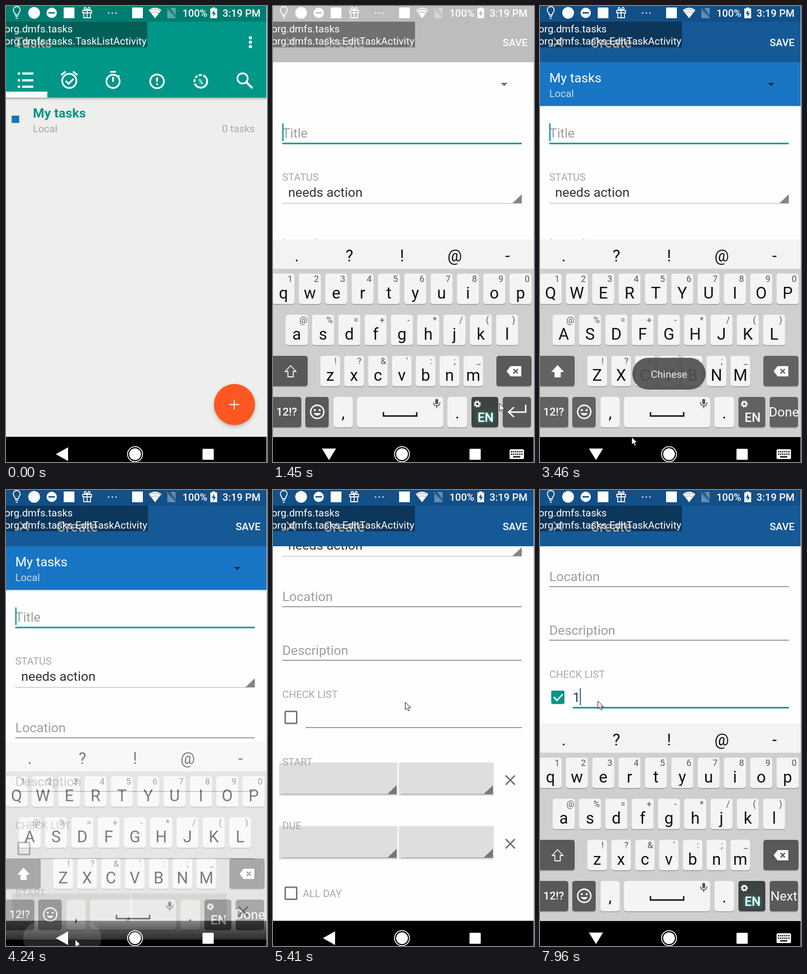
An HTML page for the animation above (8000 ms loop, 534 by 932 pixels).

```html
<!DOCTYPE html>
<html lang="en">
<head>
<meta charset="utf-8">
<title>Task editor</title>
<style>
html,body{margin:0;width:100%;height:100%;overflow:hidden;background:#000}
svg{display:block;width:534px;height:932px}
text{font:20.8px Roboto,sans-serif;white-space:pre}
.big{font-size:26.7px}
.med{font-weight:500}
.bold{font-weight:700}
.title{font-size:29px;font-weight:500}
.mid{text-anchor:middle}
.letter{font-size:33px;text-anchor:middle;fill:#111}
.alt{font-size:18px;text-anchor:middle;fill:#555}
.hint{fill:#9e9e9e}
.label{fill:#a8a8a8}
.line{fill:none;stroke:#fff;stroke-width:3.5}
.white{fill:#fff}
.rule{stroke:#757575;stroke-width:1.5}

.anim{animation:8s linear infinite}
.step{animation:8s step-end infinite}
#edit{animation-name:enter}
.paint{animation-name:paint}
#form{animation-name:scroll}
#kbA{animation-name:kbA}
#kbB{animation-name:kbB}
#kbC{animation-name:kbC}
#toast{animation-name:toast}
#pill{animation-name:pill}
#press{animation-name:press}
#ripple{animation-name:ripple;transform-box:fill-box;transform-origin:center}
#mouse{animation-name:mouse;animation-timing-function:ease-in-out}
#nameA{animation-name:nameA}
#nameB{animation-name:nameB}
#down{animation-name:down}
#back{animation-name:back}
#caret{animation-name:caret}
#checked{animation-name:checked}
#tick{animation-name:tick}
#focus{animation-name:focus}
#caret2{animation-name:caret2}
#typed{animation-name:typed}
#border{animation-name:border}

@keyframes enter{
  0%,12.375%{opacity:0;transform:translateY(75px);animation-timing-function:ease-out}
  15.8%,100%{opacity:1;transform:none}}
@keyframes paint{0%,18.9%{opacity:0}21.2%,100%{opacity:1}}
@keyframes scroll{
  0%,62.5%{transform:none;animation-timing-function:ease-in-out}
  67.5%,69.5%{transform:translateY(-268px);animation-timing-function:ease-out}
  72.5%,100%{transform:translateY(-309px)}}
@keyframes kbA{
  0%,15%{opacity:0;transform:translateY(70px);animation-timing-function:ease-out}
  17.75%,22.875%{opacity:1;transform:none}
  25.1%,100%{opacity:0;transform:translateY(70px)}}
@keyframes kbB{
  0%,24.875%{opacity:0;transform:translateY(70px);animation-timing-function:ease-out}
  27.75%{opacity:1;transform:translateY(3px);animation-timing-function:ease-out}
  28.4%,51%{opacity:1;transform:none;animation-timing-function:linear}
  55.5%,100%{opacity:0;transform:translateY(85px)}}
@keyframes kbC{
  0%,87.875%{opacity:0;transform:translateY(70px);animation-timing-function:ease-out}
  91%,100%{opacity:1;transform:none}}
@keyframes toast{0%,24%{opacity:0}26.5%,46.1%{opacity:1}49%,100%{opacity:0}}
@keyframes pill{0%,51%{opacity:0}52%,53.5%{opacity:1}56.75%,100%{opacity:0}}
@keyframes press{0%{opacity:0}6.625%{opacity:1}16%,100%{opacity:0}}
@keyframes ripple{
  0%,80%{opacity:0;transform:scale(.3)}
  81%,83.5%{opacity:1;transform:none}
  86%,100%{opacity:0;transform:none}}
@keyframes mouse{
  0%{opacity:0;transform:translate(455px,917px);animation-timing-function:step-end}
  .875%{opacity:1;transform:translate(454px,899px)}
  2.625%{opacity:1;transform:translate(453px,848px);animation-timing-function:step-end}
  6.625%,35.375%{transform:translate(463px,812px)}
  45.125%{transform:translate(165px,886px)}
  49%,58.875%{transform:translate(141px,918px)}
  62%,72.5%{transform:translate(270px,433px)}
  77.4%,83%{transform:translate(44px,423px)}
  86%,100%{transform:translate(118px,431px)}}
@keyframes nameA{0%{opacity:1}12.375%,100%{opacity:0}}
@keyframes nameB{0%{opacity:0}12.375%,100%{opacity:1}}
@keyframes down{0%{opacity:0}15.6%{opacity:1}52%{opacity:0}88.5%,100%{opacity:1}}
@keyframes back{0%{opacity:1}15.6%{opacity:0}52%{opacity:1}88.5%,100%{opacity:0}}
@keyframes caret{0%{opacity:1}35.4%{opacity:0}41.8%{opacity:1}48.2%{opacity:0}51%,100%{opacity:1}}
@keyframes checked{0%{opacity:0}80%,100%{opacity:1}}
@keyframes tick{0%{opacity:0}82.5%,100%{opacity:1}}
@keyframes focus{0%{opacity:0}87.875%,100%{opacity:1}}
@keyframes caret2{0%{opacity:0}87.875%{opacity:1}93.75%{opacity:0}97.5%,100%{opacity:1;transform:translateX(14px)}}
@keyframes typed{0%{opacity:0}97.5%,100%{opacity:1}}
@keyframes border{0%{fill:#fff}4.5%,100%{fill:#c4c4c4}}
</style>
</head>
<body>
<svg viewBox="0 0 534 932">
  <defs>
    <filter id="soft" x="-30%" y="-30%" width="160%" height="160%"><feGaussianBlur stdDeviation="4"/></filter>
    <filter id="edge" x="-5%" y="-10%" width="110%" height="120%"><feGaussianBlur stdDeviation="1.2"/></filter>
    <filter id="glow" x="-40%" y="-40%" width="180%" height="180%"><feDropShadow dx="0" dy="0" stdDeviation="3" flood-color="#10c8b4"/></filter>
    <linearGradient id="fall" x2="0" y2="1"><stop stop-opacity=".28"/><stop offset="1" stop-opacity="0"/></linearGradient>
    <linearGradient id="dim" x2="0" y2="1"><stop stop-opacity="0"/><stop offset="1" stop-opacity=".85"/></linearGradient>
  </defs>

  <g id="list">
    <rect width="534" height="932" fill="#eeeeec"/>
    <rect width="534" height="187" fill="#009688"/>
    <rect width="534" height="32" fill="#007d71"/>
    <rect y="187" width="534" height="6" fill="url(#fall)"/>
    <text class="title white" x="18" y="85">Tasks</text>
    <g class="white"><circle cx="500" cy="65" r="3.3"/><circle cx="500" cy="74" r="3.3"/><circle cx="500" cy="83" r="3.3"/></g>
    <rect y="175" width="84.500" height="12" class="white"/>
    <g class="line">
      <path d="M24 138h5m4 0h23M24 152h5m4 0h23M24 165h5m4 0h23" stroke-width="4.5"/>
      <circle cx="129.500" cy="153" r="14.500"/><path d="M122 153l6 6 10-10M113 141l9-7M146 141l-9-7"/>
      <circle cx="219" cy="154" r="13.500"/><path d="M213 134.500h12M219 145v10M229 142l3 3"/>
      <circle cx="309" cy="154" r="14"/><path d="M309 146v9M309 158v3.500"/>
      <circle cx="398.500" cy="154" r="13" stroke-width="4" stroke-dasharray="36 3 6 3 6 3 6 3"/>
      <circle cx="484" cy="148" r="10.500"/><path d="M491 155l13 13" stroke-width="4.500"/>
    </g>
    <text class="med white mid" x="398.500" y="159.500" style="font-size:15px">%</text>
    <rect x="11.500" y="224" width="15.500" height="15" fill="#1976b4"/>
    <text class="big bold" x="55" y="228" fill="#009688">My tasks</text>
    <text class="label" x="55" y="258">Local</text>
    <text class="label" x="509" y="258" text-anchor="end">0 tasks</text>
    <circle cx="467.500" cy="818" r="41" opacity=".3" filter="url(#soft)"/>
    <circle cx="467.500" cy="814.500" r="42" fill="#ff5722"/>
    <circle id="press" class="step white" cx="467.500" cy="814.500" r="42" fill-opacity=".15"/>
    <path class="line" d="M457 814.500h20M467 804.500v20" style="stroke-width:2"/>
  </g>

  <g id="edit" class="anim">
    <rect width="534" height="1010" fill="#fefefe"/>
    <g id="form" class="anim">
      <g class="anim paint">
        <rect y="110" width="534" height="94.500" fill="#1976c5"/>
        <text class="big white" x="19" y="156">My tasks</text>
        <text class="white" x="19" y="186" opacity=".75">Local</text>
      </g>
      <path d="M466 157h14l-7 7z" fill="#000" opacity=".55"/>
      <text class="big hint" x="19" y="269">Title</text>
      <rect x="19" y="279.500" width="490" height="3" fill="#009688"/>
      <rect id="caret" class="step" x="19" y="240" width="2.500" height="36" fill="#009688"/>
      <text class="label" x="19" y="357">STATUS</text>
      <text class="big" x="31" y="390" fill="#333">needs action</text>
      <path d="M19 403.500h490" stroke="#c4c4c4" stroke-width="1.500"/>
      <path d="M509 385v18h-19z" fill="#858585"/>
      <text class="big hint" x="19" y="495">Location</text><path class="rule" d="M19 506.500h490"/>
      <text class="big hint" x="19" y="605">Description</text><path class="rule" d="M19 616h490"/>
      <text class="label" x="19" y="693">CHECK LIST</text>
      <circle id="ripple" class="anim" cx="38" cy="732" r="25" fill="#009688" fill-opacity=".13"/>
      <rect x="25" y="720.500" width="23.500" height="24.500" rx="1.500" fill="#fefefe" stroke="#757575" stroke-width="3"/>
      <g id="checked" class="step">
        <rect x="23" y="719" width="27" height="27" rx="3" fill="#009688"/>
        <path id="tick" class="step line" d="M28 732l6.500 7 12-12.500" style="stroke-width:3"/>
      </g>
      <path class="rule" d="M67 753.500h442"/>
      <rect id="focus" class="step" x="67" y="752.500" width="442" height="3" fill="#009688"/>
      <text id="typed" class="big step" x="67" y="742" fill="#333">1</text>
      <rect id="caret2" class="step" x="67.500" y="714" width="2.200" height="35" fill="#2c6484"/>
      <g id="dates"></g>
      <rect x="25" y="1080" width="23.500" height="24.500" rx="1.500" fill="none" stroke="#757575" stroke-width="3"/>
      <text class="label" x="61" y="1100">ALL DAY</text>
      <text class="label" x="19" y="1180">TIME ZONE</text>
    </g>
    <rect width="534" height="115" fill="#bdbdbd"/>
    <g class="anim paint"><rect width="534" height="115" fill="#155a96"/><rect width="534" height="32" fill="#125088"/></g>
    <path class="line" d="M28 65l18 18M46 65l-18 18" style="stroke-width:3"/>
    <text class="title white" x="103" y="85">Create</text>
    <text class="med white" x="470" y="82">SAVE</text>
  </g>

  <rect y="880.500" width="534" height="52"/>
  <g id="kbA" class="anim"></g>
  <g id="kbB" class="anim"></g>
  <g id="kbC" class="anim"></g>
  <rect y="881" width="534" height="51" fill="url(#dim)"/>
  <rect id="pill" class="anim" x="35" y="882" width="160" height="68" rx="34" fill="#fff" fill-opacity=".14"/>
  <g class="white">
    <path id="back" class="step" d="M102 916l25-14v28z"/>
    <g id="down" class="step">
      <path d="M100 904.500h29l-14.500 23.500z"/>
      <rect x="484" y="906" width="29.500" height="20" rx="2.500"/>
      <path d="M487 911h24M487 916h24" stroke="#000" stroke-width="2.500" stroke-dasharray="2.600 1.600"/>
      <path d="M491 921.500h15" stroke="#000" stroke-width="2.500"/>
    </g>
    <circle cx="264" cy="916" r="12"/>
    <circle cx="264" cy="916" r="15.300" fill="none" stroke="#fff" stroke-width="1.800"/>
    <rect x="402" y="905" width="23" height="22.500" rx="1.500"/>
  </g>

  <g id="toast" class="anim">
    <rect x="189" y="719" width="150" height="65" rx="32.500" fill="#505050" opacity=".92"/>
    <text class="mid" x="264" y="760" fill="#eee">Chinese</text>
  </g>

  <g class="white">
    <path d="M19 18c0-4-4-5-4-10a7 7 0 0 1 14 0c0 5-4 6-4 10z" fill="none" stroke="#fff" stroke-width="1.800"/>
    <path d="M19 21h6M20 25h4" stroke="#fff" stroke-width="2"/>
    <circle cx="57.500" cy="14" r="12"/>
    <path fill-rule="evenodd" d="M93.500 3.500a10.500 10.500 0 1 0 .01 0zM87 12.500h13v3H87z"/>
    <rect x="118" y="3" width="22" height="22"/>
    <path d="M157 9h18v5h-18zM159 14h14v10h-14zM166 9v15M166 9c-8-1-7-7-3-6l3 6c8-1 7-7 3-6z" fill="none" stroke="#fff" stroke-width="1.800"/>
    <circle cx="210" cy="14.500" r="1.400"/><circle cx="217.500" cy="14.500" r="1.400"/><circle cx="225" cy="14.500" r="1.400"/>
    <rect x="258" y="3" width="22" height="22"/>
    <path d="M305 25L292 8.500q13-10 26 0z"/>
    <path d="M293.500 10.500q11.500-8 23 0M297 14.500q8-5 16 0" fill="none" stroke="#000" stroke-opacity=".3" stroke-width="1.500"/>
    <path d="M336 4h11v16zM330 8l17 17h-17z" opacity=".35"/>
    <path d="M329 4l18 20" stroke="#fff" stroke-width="1.500" opacity=".35"/>
    <path fill-rule="evenodd" d="M422 3h6v2h4v20h-14V5h4zM426 8l-5 8h3.500v6l5-8H426z"/>
    <text class="med" x="361" y="22">100%</text>
    <text class="med" x="443" y="22">3:19 PM</text>
  </g>

  <g id="nameA" class="step"><rect y="32" width="289" height="52.500" opacity=".36"/><text class="white" x="-3" y="79">org.dmfs.tasks.TaskListActivity</text></g>
  <g id="nameB" class="step"><rect y="32" width="290.500" height="52.500" opacity=".4"/><text class="white" x="-3" y="79">org.dmfs.tasks.EditTaskActivity</text></g>
  <text class="white" x="-3" y="54">org.dmfs.tasks</text>

  <rect id="border" class="step" x="533" width="1" height="932"/>
  <path id="mouse" class="anim" d="M.5 .5v15.500l3.600-3.300 2.600 5.800 2.600-1.200-2.600-5.600h5z" fill="#fff" stroke="#111"/>
</svg>
<script>
const $ = id => document.getElementById(id);
const label = (x, y, s, cls, extra = '') =>
  `<text class="${cls}" x="${x}" y="${y}" ${extra}>${s.replace('&', '&amp;')}</text>`;
const rect = (x, y, w, h, fill, extra = '') =>
  `<rect x="${x}" y="${y}" width="${w}" height="${h}" fill="${fill}" ${extra}/>`;
const key = (x, y, w, fill = '#f4f4f3') =>
  rect(x, y + 2, w, 62, '#0003', 'rx="5"') + rect(x, y, w, 62, fill, 'rx="5"');

const rows = [
  ['qwertyuiop', '1234567890', -1, 547, 45, 53.9],
  ['asdfghjkl', '@%=+-*/()', 26, 631, 45, 53.8],
  ['zxcvbnm', "!?&':;_", 97, 715, 40, 48.8]
];
const ARROW = '<path class="line" d="M517 815v15h-34M493 820l-11 10 11 10" style="stroke-width:3"/>';

function keyboard(upper, enter) {
  const dark = upper ? '#626262' : '#585a59';
  let s = rect(0, 477, 534, 60, '#f3f3f2') + rect(0, 537, 534, 344, '#cfcfcd');
  [...'.?!@-'].forEach((c, i) => s += label(48.5 + 107.8 * i, 522, c, 'letter'));
  for (const [main, alt, x0, y, w, pitch] of rows)
    [...main].forEach((c, i) => {
      const x = x0 + pitch * i;
      s += key(x, y, w) + label(x + w / 2, y + 50.5, upper ? c.toUpperCase() : c, 'letter')
        + label(x + w - 9, y + 17, alt[i], 'alt');
    });
  s += key(-4, 715, 75, dark) + key(457, 715, 72, dark)
    + key(-4, 799, 62, dark) + key(66, 799, 48, dark) + key(124, 799, 39)
    + key(172, 799, 176) + key(357, 799, 40)
    + key(406, 799, 55, upper ? dark : '#3e4241') + key(470, 799, 58, dark);
  s += `<path d="M36 735l11 12h-5.500v11h-11v-11H25z" fill="${upper ? '#fff' : 'none'}" stroke="#fff" stroke-width="1.800"/>
    <path class="white" d="M478 746.500l8-10.500h22v21h-22z"/>
    <path d="M492 742l9 9M501 742l-9 9" stroke="${dark}" stroke-width="2.500"/>
    <circle class="line" cx="90.500" cy="829.500" r="13.500" style="stroke-width:2.800"/>
    <circle class="white" cx="85.500" cy="826" r="2.200"/><circle class="white" cx="95.500" cy="826" r="2.200"/>
    <path class="white" d="M83 832h15q-7.500 10-15 0z"/>
    <path d="M226 830v8h68v-8" fill="none" stroke="#111" stroke-width="2.800"/>
    <rect x="332" y="803" width="6" height="11" rx="3" fill="#555"/>
    <path d="M328.500 810q0 7 6.500 7t6.500-7M335 817v5" fill="none" stroke="#555" stroke-width="1.800"/>
    <circle cx="418" cy="813.500" r="4" fill="none" stroke="#fff" stroke-width="3"/>
    <circle cx="418" cy="813.500" r="6.300" fill="none" stroke="#fff" stroke-width="2" stroke-dasharray="2.500 2.448"/>`;
  s += label(28, 837, '12!?', 'med white mid', 'style="font-size:22.500px"')
    + label(143.5, 843, ',', 'letter') + label(377, 843, '.', 'letter')
    + label(435, 850, 'EN', 'med white mid', `style="font-size:26px" ${upper ? '' : 'filter="url(#glow)"'}`);
  return s + (enter ? label(499, 839, enter, 'big white mid') : ARROW);
}

function dateRow(name, y) {
  const box = (x, w) => rect(x - 1, y, w + 2, 67, '#0003', 'filter="url(#edge)"')
    + rect(x, y, w, 65, '#dededc')
    + `<path d="M${x + 4} ${y + 64}H${x + w}" stroke="#999"/><path d="M${x + w} ${y + 46}v18h-19z" fill="#777"/>`;
  return box(14, 239) + box(259, 191) + label(19, y + 5.5, name, 'label')
    + `<path d="M476 ${y + 26}l19 19m0-19l-19 19" stroke="#6c6c6c" stroke-width="2.800"/>`;
}

$('kbA').innerHTML = keyboard(false, '');
$('kbB').innerHTML = keyboard(true, 'Done');
$('kbC').innerHTML = keyboard(false, 'Next');
$('dates').innerHTML = dateRow('START', 825.5) + dateRow('DUE', 955.5);
</script>
</body>
</html>
```
